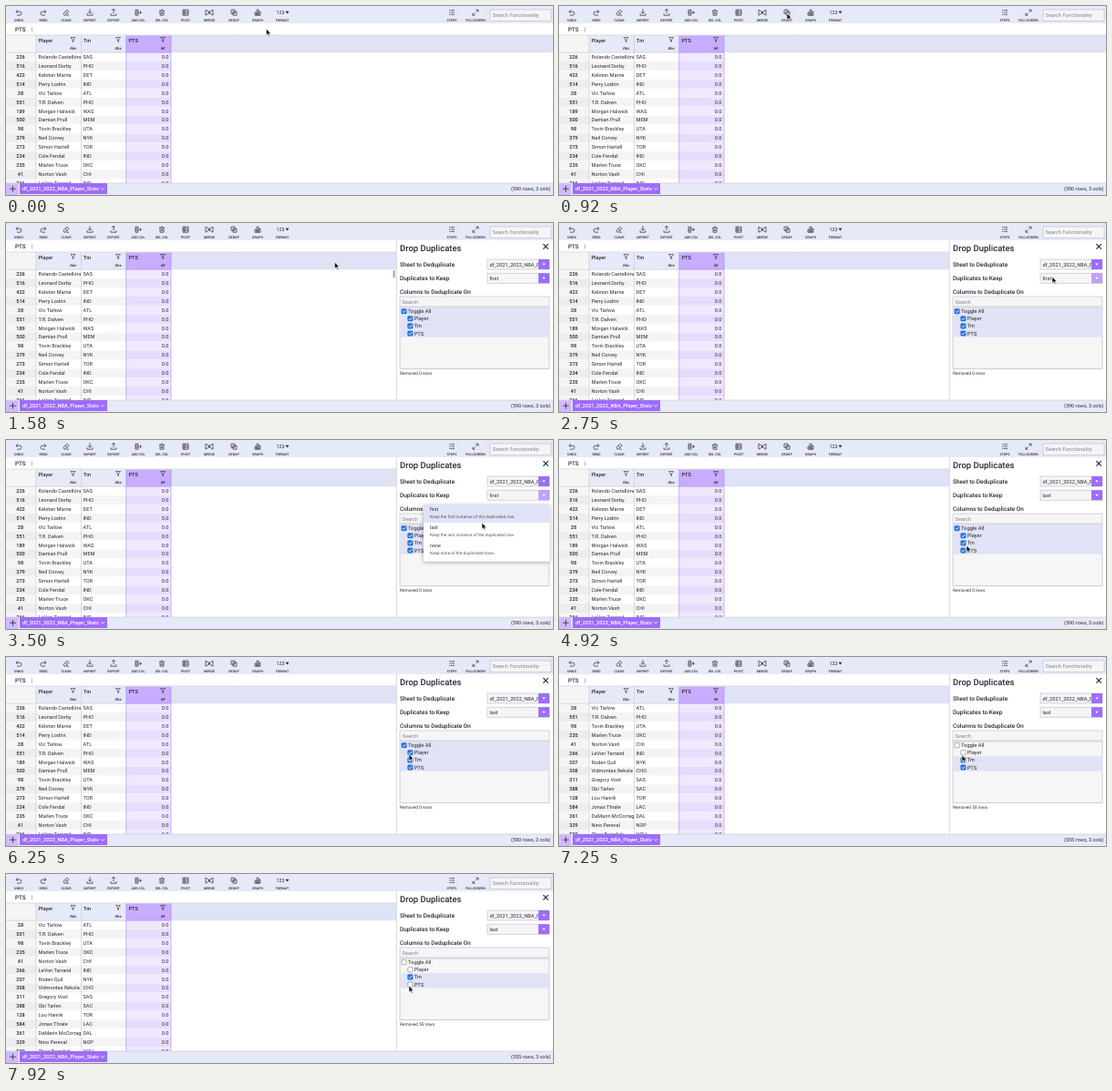
These frames come from a looping animation (600x208 px, 8 s). An HTML page:

```html
<!DOCTYPE html>
<html lang="en">
<head>
<meta charset="utf-8">
<title>Drop duplicates</title>
<style>
html, body { margin: 0; width: 100%; height: 100%; overflow: hidden; background: #fff; }
svg { display: block; width: 100vw; height: 100vh; font-family: Roboto, sans-serif; }
text { white-space: pre; text-rendering: geometricPrecision; }
</style>
</head>
<body>
<svg id="stage" viewBox="0 0 600 208"></svg>
<script>
const LOOP = 8000, STEP = 1000 / 12;
const INK = '#2b2932', PURPLE = '#9d6cff', PALE_PURPLE = '#d0b9fe';
const LAVENDER = '#e6e9f8', SELECTED = '#dfe3f5', FIELD = '#f5f5f7', LINE = '#c5c6d0', HINT = '#85858d';
const SHEET = 'df_2021_2022_NBA_Player_Stats';
const stage = document.getElementById('stage');

// y is the vertical middle of the capital letters
const text = (x, y, s, size = 5.6, o = {}) =>
  `<text x="${x}" y="${y + size * .36}" font-size="${size}" fill="${o.fill || INK}" font-weight="${o.weight || 400}" text-anchor="${o.anchor || 'start'}" ${o.extra || ''}>${s}</text>`;
const rect = (x, y, w, h, fill, extra = '') =>
  `<rect x="${x}" y="${y}" width="${w}" height="${h}" fill="${fill}" ${extra}/>`;
const path = (d, stroke = INK, width = .7, fill = 'none', extra = '') =>
  `<path d="${d}" stroke="${stroke}" stroke-width="${width}" fill="${fill}" ${extra}/>`;
const group = (id, body, extra = '') => `<g id="${id}" ${extra}>${body}</g>`;
const border = (color = LINE) => `stroke="${color}" stroke-width=".6"`;

// Icons are drawn in a box from -4 to 4
const tools = [
  [14, 'UNDO', 'M-1-3L-3-1L-1 1M-3-1H1A2 2 0 0 1 1 3H-2'],
  [41, 'REDO', 'M1-3L3-1L1 1M3-1H-1A2 2 0 0 0-1 3H2'],
  [66, 'CLEAR', 'M-3 1L1-3L3-1L-1 3H-2ZM-1-1L1 1M0 3H3'],
  [92, 'IMPORT', 'M0-4V1M-2-1L0 1L2-1M-3 1V3H3V1'],
  [118, 'EXPORT', 'M0 1V-4M-2-2L0-4L2-2M-3 1V3H3V1'],
  [145, 'ADD COL', 'M-3-3H0V3H-3ZM-3-1H0M-3 1H0M1 0H4M2.5-1.5V1.5'],
  [171, 'DEL COL', 'M-2-2V3H2V-2M-3-2H3M-1-3H1M-.7-.5V1.8M.7-.5V1.8'],
  [197, 'PIVOT', 'M-3-3H3V3H-3ZM-3-1H3M-1-3V3M-3 1H3'],
  [223, 'MERGE', 'M-4-3L1 0L-4 3ZM4-3L-1 0L4 3Z'],
  [250, 'DEDUP', 'M-3-3H1V1H-3ZM-1-1H3V3H-1Z'],
  [276, 'GRAPH', 'M-3 3V0H-1V3ZM-1 3V-3H1V3ZM1 3V-1H3V3Z'],
  [303, 'FORMAT', ''],
  [489, 'STEPS', 'M-3-2.5H-1.5M-.8-2.5H3M-3-.2H-1.5M-.8-.2H3M-3 2.2H-1.5M-.8 2.2H3'],
  [515, 'FULLSCREEN', 'M.5-3H3V-.5M3-3L.5-.5M-3 .5V3H-.5M-3 3L-.5 .5'],
];

const allRows = [
  [226, 'Rolando Castellóne', 'SAS'], [516, 'Leonard Dorby', 'PHO'], [422, 'Kelston Marne', 'DET'],
  [514, 'Perry Lodrin', 'IND'], [28, 'Vic Tarlow', 'ATL'], [551, 'T.R. Dalven', 'PHO'],
  [189, 'Morgan Halwick', 'WAS'], [500, 'Damian Prull', 'MEM'], [98, 'Tovin Brackley', 'UTA'],
  [379, 'Neil Corvey', 'NYK'], [273, 'Simon Hartell', 'TOR'], [234, 'Cole Fendal', 'IND'],
  [235, 'Marlen Truce', 'OKC'], [41, 'Norton Vash', 'CHI'], [266, 'LeVon Tarrand', 'IND'],
];
const keptRows = [
  ...[4, 5, 8, 12, 13, 14].map(i => allRows[i]),
  [207, 'Roden Quil', 'NYK'], [308, 'Vidmontas Rekola', 'CHO'], [311, 'Gregory Vost', 'SAS'],
  [388, 'Obi Tarlen', 'SAC'], [128, 'Lou Hanrik', 'TOR'], [584, 'Jonas Thrale', 'LAC'],
  [361, 'DaMarin McCorraghy', 'DAL'], [329, 'Nino Pereval', 'NOP'], [530, 'Theo Brandick', 'HOU'],
];

const toolbar = () => rect(0, 0, 600, 19, LAVENDER) +
  tools.map(([x, label, d]) =>
    path(d, INK, .7, 'none', `transform="translate(${x} 7.2)"`) +
    text(x, 16, label, 3.65, { anchor: 'middle', weight: 500 })).join('') +
  text(296.5, 7, '123', 5.4) + path('M306.5 5.8h4l-2 2.8z', 'none', 0, INK) +
  rect(531, 4, 67, 12.5, FIELD, border('#b9bac4')) +
  text(533.5, 10.3, 'Search Functionality', 5.7, { fill: HINT });

const formulaBar = () => rect(0, 19, 600, 13, '#fff') +
  text(10, 26, 'PTS', 6.3, { weight: 500 }) + path('M28.5 23.5V28.5', '#888', .6) + path('M0 32H600', LINE, .6);

const header = (x, w, label, type, selected) =>
  rect(x, 32.3, w, 19, selected ? '#c8acff' : LAVENDER) +
  text(x + 2.5, 38, label, 5.6, { weight: 500 }) +
  path(`M${x + w - 11.5} 34.5h5l-2 2.6v2.5l-1-.6v-1.9z`, INK, .6) +
  text(x + w - 8.8, 46, type, 4.2, { weight: 500, anchor: 'middle' });

const tableRows = rows => rows.map(([index, player, team], i) => {
  const y = 51.2 + i * 9.92, mid = y + 4.8, odd = i % 2;
  return rect(0, y, 33, 9.92, odd ? '#ededf0' : '#f5f5f6') +
    rect(33, y, 99, 9.92, odd ? '#f4f4f5' : '#fff') +
    rect(132, y, 49, 9.92, odd ? '#e8dcfc' : '#f0e8fe') +
    text(16, mid, index, 5.6, { anchor: 'middle', weight: 500 }) +
    text(35.5, mid, player, 5.6, { extra: 'clip-path="url(#playerClip)"' }) +
    text(84.5, mid, team) + text(178.5, mid, '0.0', 5.6, { anchor: 'end' });
}).join('');

const table = () => rect(0, 32.3, 33, 19, '#f5f5f6') + rect(181, 32.3, 419, 19, SELECTED) +
  header(33, 49.5, 'Player', 'Abc') + header(82.5, 49.5, 'Tm', 'Abc') + header(132, 49, 'PTS', 'd#', true) +
  group('allRows', tableRows(allRows)) + group('keptRows', tableRows(keptRows)) +
  path('M33 32V195M82.5 32V195M0 51.2H132', LINE, .6) +
  path('M131.7 32.3V195M181 32.3V195M132 51.2H181', PURPLE, .5) +
  rect(424.5, 52, 2.2, 8.5, '#aaa', 'id="thumb" rx="1"');

const select = (y, id, value) =>
  rect(528, y, 68, 11, FIELD, border('#b9bac4')) +
  text(530.5, y + 5.5, value, 5.6, { extra: `id="${id}Value" clip-path="url(#selectClip)"` }) +
  rect(584, y, 12, 11, PURPLE, `id="${id}Button"`) + path(`M588.3 ${y + 4.6}h3.4l-1.7 2.2z`, 'none', 0, '#fff');

const checkRow = (id, label, x, y) =>
  rect(432.5, y - 4.1, 163, 8.2, SELECTED, `id="${id}Row"`) +
  rect(x, y - 2.6, 5.2, 5.2, '#fff', 'rx=".8" stroke="#777" stroke-width=".6"') +
  group(id + 'Check', rect(x - .2, y - 2.8, 5.6, 5.6, '#1a73e8', 'rx=".8"') +
    path(`M${x + 1} ${y}l1.3 1.4l2.2-2.8`, '#fff', .9)) +
  text(x + 6.9, y, label, 5.8);

const panel = () => rect(428, 19, 172, 176, '#fff') + path('M428.3 19V195', LINE, .7) +
  text(432, 27.3, 'Drop Duplicates', 9.5, { weight: 500 }) +
  path('M589.4 23.2l5.4 5.4m0-5.4l-5.4 5.4', INK, 1.2) +
  text(432, 45.5, 'Sheet to Deduplicate', 6.5, { weight: 500 }) + select(40, 'sheet', SHEET) +
  text(432, 60.7, 'Duplicates to Keep', 6.5, { weight: 500 }) + select(55.2, 'keep', 'first') +
  text(432, 76, 'Columns to Deduplicate On', 6.4, { weight: 500 }) +
  rect(432, 81, 164, 11, FIELD, border('#b9bac4')) + text(434.5, 86.5, 'Search', 5.7, { fill: HINT }) +
  rect(432, 93, 164, 67.3, '#f6f6f7', border('#b0b1bb')) +
  checkRow('toggle', 'Toggle All', 434, 97.2) + checkRow('player', 'Player', 440.8, 105.3) +
  checkRow('tm', 'Tm', 440.8, 113.4) + checkRow('pts', 'PTS', 440.8, 121.5) +
  text(432, 165.3, '', 4.8, { extra: 'id="removed"' });

const option = (y, name, description) =>
  text(465, y, name, 5.4) + text(465, y + 8.3, description, 4.74, { fill: '#55525d' });
const menu = () => rect(458, 71, 138.5, 62.5, '#fff', 'filter="url(#shadow)"') +
  rect(458, 71, 138.5, 20, SELECTED, 'id="hover"') +
  option(76, 'first', 'Keep the first instance of the duplicated row.') +
  option(96.2, 'last', 'Keep the last instance of the duplicated row.') +
  option(116.4, 'none', 'Keep none of the duplicated rows..');

const footer = () => rect(0, 195, 600, 13, LAVENDER) + path('M0 195H600', LINE, .6) +
  rect(0, 195.3, 13.5, 12.7, PALE_PURPLE) +
  path('M4.2 201.2h6.6m-3.3-3.3v6.6', INK, .8) + rect(15, 195, 96, 12, PURPLE) +
  text(18, 201, SHEET, 5.65, { fill: '#fff', weight: 500 }) + path('M104 200.2l2 2l2-2', '#fff', .8) +
  text(597.5, 201, '', 5.5, { anchor: 'end', extra: 'id="shape"' });

stage.innerHTML = `<defs>
  <clipPath id="playerClip">${rect(33, 51, 49, 150, '#000')}</clipPath>
  <clipPath id="selectClip">${rect(528, 38, 56, 30, '#000')}</clipPath>
  <filter id="shadow" x="-10%" y="-10%" width="120%" height="130%"><feDropShadow dx="0" dy="1" stdDeviation="2" flood-opacity=".35"/></filter>
  </defs>` + rect(0, 0, 600, 208, '#fff') + table() + toolbar() + formulaBar() +
  group('panel', panel()) + footer() + group('menu', menu()) +
  group('cursor', path('M0 0V7.2L1.7 5.7L2.8 8.2L4 7.7L2.9 5.2H5.1Z', '#fff', .6, '#111'));

const el = Object.fromEntries([...stage.querySelectorAll('[id]')].map(e => [e.id, e]));
const show = (e, on) => e.setAttribute('visibility', on ? 'visible' : 'hidden');

// Pointer stops: time, x, y
const stops = [
  [0, 285.5, 25], [80, 285.5, 25], [700, 250, 8], [1170, 250, 8], [1580, 360, 43], [1670, 476, 63],
  [1830, 518, 65], [2170, 518, 65], [2670, 541, 59], [3170, 541, 59], [3500, 522, 91], [3670, 519, 97],
  [3830, 517, 98], [4330, 517, 98], [4920, 447, 116], [5420, 447, 112], [5750, 446, 106],
  [5920, 442, 107], [7170, 442, 107], [7670, 442, 123], [LOOP, 442, 123],
];
function pointer(t) {
  const i = Math.max(1, stops.findIndex(s => s[0] >= t));
  const [t0, x0, y0] = stops[i - 1], [t1, x1, y1] = stops[i];
  const p = (t - t0) / (t1 - t0), k = p * p * (3 - 2 * p);
  return [x0 + (x1 - x0) * k, y0 + (y1 - y0) * k];
}

function draw(now) {
  const t = Math.floor((now % LOOP) / STEP + .1) * STEP % LOOP;
  const after = ms => t >= ms - 5;
  const open = after(1000), menuOpen = after(2920) && !after(4170);
  const playerOff = after(6330), filtered = after(6920), ptsOff = after(7830);

  el.cursor.setAttribute('transform', `translate(${pointer(t)})`);
  el.panel.style.display = open ? '' : 'none';
  el.menu.style.display = menuOpen ? '' : 'none';
  show(el.thumb, open && !after(2170));
  el.hover.setAttribute('y', after(3580) ? 91.2 : 71);
  el.keepButton.setAttribute('opacity', after(2670) && !after(4170) ? .6 : 1);
  el.keepValue.textContent = after(4170) ? 'last' : 'first';
  for (const id of ['toggle', 'player']) {
    show(el[id + 'Row'], !playerOff);
    show(el[id + 'Check'], !playerOff);
  }
  show(el.ptsCheck, !ptsOff);
  show(el.allRows, !filtered);
  show(el.keptRows, filtered);
  el.removed.textContent = `Removed ${filtered ? 55 : 0} rows`;
  el.shape.textContent = `(${filtered ? 555 : 590} rows, 3 cols)`;
  requestAnimationFrame(() => draw(performance.now()));
}
draw(performance.now());
</script>
</body>
</html>
```
